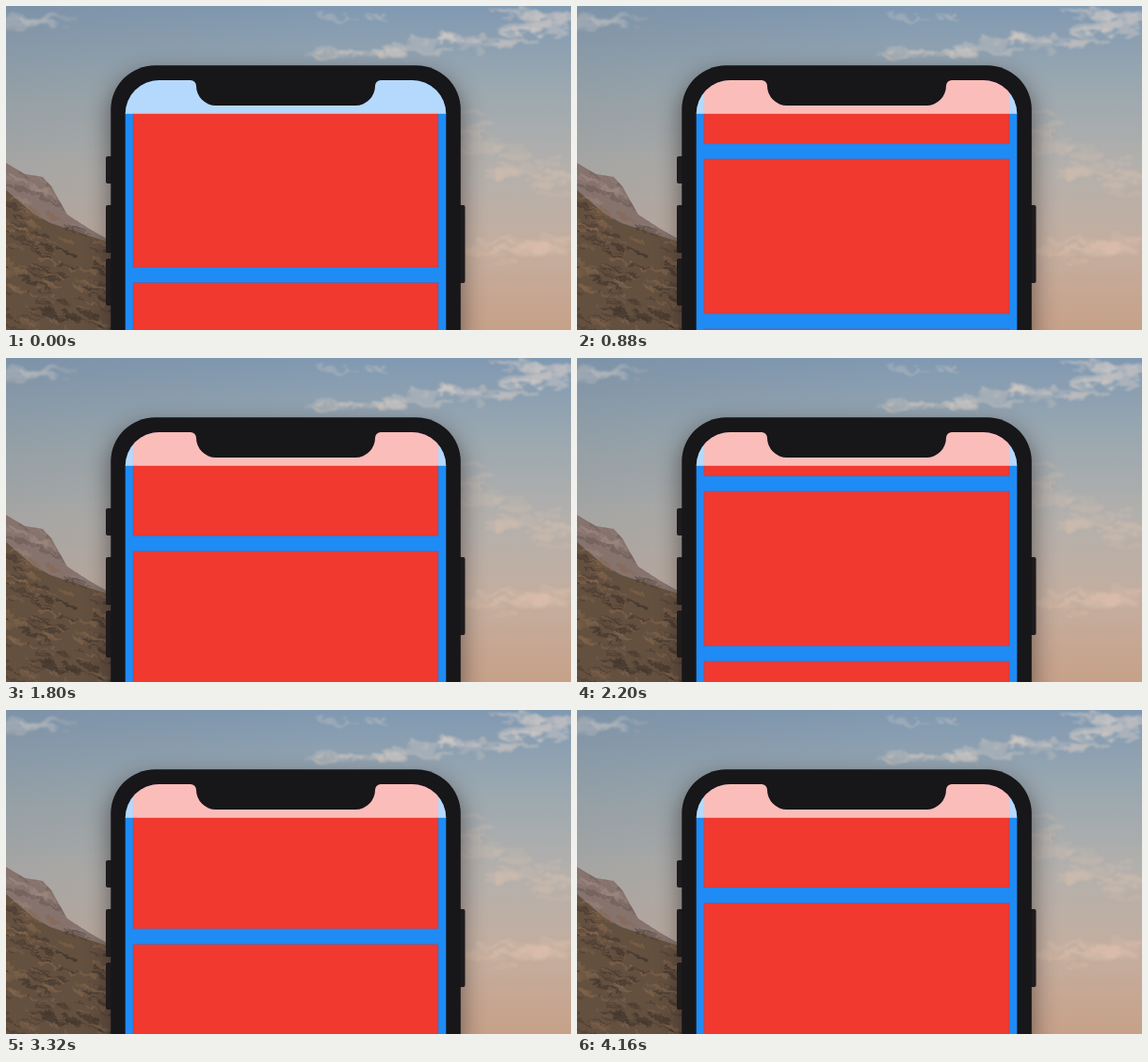
Write an HTML page that moves like this. It is 600 px wide and 345 px high and loops after 4.2 s.

```html
<!DOCTYPE html>
<html lang="en">
<head>
<meta charset="utf-8">
<title>Phone scroll</title>
<style>
  html, body { margin: 0; width: 100%; height: 100%; overflow: hidden; background: #8fa3b0; }
  svg { display: block; width: 600px; height: 345px; }
  #cards { animation: scroll 4200ms infinite; }

  /* Two long flicks; the curves keep the speed continuous between stops. */
  @keyframes scroll {
    0%      { transform: translateY(0); animation-timing-function: cubic-bezier(.333, 0, .667, .49); }
    10.476% { transform: translateY(-120.5px); animation-timing-function: cubic-bezier(.333, .324, .667, .684); }
    25.714% { transform: translateY(-397px); animation-timing-function: cubic-bezier(.333, .42, .667, .745); }
    42.857% { transform: translateY(-631.5px); animation-timing-function: cubic-bezier(.333, .52, .667, .94); }
    52.381% { transform: translateY(-695.5px); animation-timing-function: cubic-bezier(.333, .044, .667, .795); }
    79.048% { transform: translateY(-950px); animation-timing-function: cubic-bezier(.333, .89, .667, 1); }
    99.048%, 100% { transform: translateY(-994px); }
  }
</style>
</head>
<body>
<svg viewBox="0 0 600 345" color-interpolation-filters="sRGB">
  <defs>
    <linearGradient id="sky" x2="0" y2="1">
      <stop offset="0" stop-color="#8099b2"/>
      <stop offset=".25" stop-color="#9ba8b0"/>
      <stop offset=".5" stop-color="#b4b0ac"/>
      <stop offset=".75" stop-color="#c4ae9f"/>
      <stop offset="1" stop-color="#c7a189"/>
    </linearGradient>
    <linearGradient id="haze">
      <stop offset="0" stop-color="#6f7a80" stop-opacity=".2"/>
      <stop offset=".6" stop-color="#6f7a80" stop-opacity="0"/>
    </linearGradient>
    <filter id="wisp" filterUnits="userSpaceOnUse" x="-40" y="-40" width="680" height="420">
      <feTurbulence type="fractalNoise" baseFrequency=".05 .1" numOctaves="4" seed="8"/>
      <feDisplacementMap in="SourceGraphic" scale="22" xChannelSelector="R" yChannelSelector="G"/>
      <feGaussianBlur stdDeviation="1.1"/>
    </filter>
    <filter id="rough" filterUnits="userSpaceOnUse" x="-10" y="150" width="150" height="210">
      <feTurbulence type="fractalNoise" baseFrequency=".12" numOctaves="3" seed="4"/>
      <feDisplacementMap in="SourceGraphic" scale="9" xChannelSelector="R" yChannelSelector="G"/>
      <feGaussianBlur stdDeviation=".5"/>
    </filter>
    <filter id="soft" filterUnits="userSpaceOnUse" x="50" y="20" width="500" height="400">
      <feGaussianBlur stdDeviation="12"/>
    </filter>
    <clipPath id="ridge">
      <path d="M0 167L20 179 39 182 48 192 65 222 88 237 125 258V345H0Z"/>
    </clipPath>
    <clipPath id="screen">
      <rect x="126.7" y="79" width="340.6" height="320" rx="36"/>
    </clipPath>
  </defs>

  <rect width="600" height="345" fill="url(#sky)"/>
  <rect width="600" height="345" fill="url(#haze)"/>
  <g id="clouds" filter="url(#wisp)"></g>

  <g clip-path="url(#ridge)">
    <rect y="160" width="125" height="185" fill="#86736d"/>
    <path d="M0 196L29 221 47 231 125 257V345H0Z" fill="#64503f"/>
    <g id="rocks" filter="url(#rough)" stroke-linecap="round"></g>
  </g>

  <rect x="109" y="72" width="376" height="320" rx="46" fill="#20191a" opacity=".5" filter="url(#soft)"/>
  <g fill="#1e1b1d">
    <rect x="106" y="160" width="8" height="29" rx="2"/>
    <rect x="106" y="212" width="8" height="51" rx="2"/>
    <rect x="106" y="269" width="8" height="50" rx="2"/>
    <rect x="480" y="212" width="7.5" height="83" rx="2"/>
  </g>
  <rect x="111.3" y="63.3" width="371.5" height="340" rx="47" fill="#171619"/>

  <g clip-path="url(#screen)">
    <rect x="126" y="79" width="342" height="266" fill="#1f8bf5"/>
    <g id="cards"></g>
    <rect x="126" y="79" width="342" height="36" fill="#fff" opacity=".67"/>
    <rect x="126" y="114.5" width="342" height=".5" fill="#555" opacity=".35"/>
  </g>
  <path d="M196 78V79A6 6 0 0 1 202 85A21 21 0 0 0 223 106H371A21 21 0 0 0 392 85A6 6 0 0 1 398 79V78Z" fill="#171619"/>
</svg>
<script>
  let seed = 11;
  const random = () => (seed = seed * 16807 % 2147483647) / 2147483647;
  const between = (a, b) => a + (b - a) * random();

  const add = (parent, tag, attrs) => {
    const el = document.createElementNS("http://www.w3.org/2000/svg", tag);
    for (const key in attrs) el.setAttribute(key, attrs[key]);
    document.getElementById(parent).append(el);
  };

  const pitch = 181;
  for (let i = 0; i < 8; i++) {
    add("cards", "rect", {
      x: 135, y: 113.8 + i * pitch, width: 324, height: 164.2,
      fill: "#f1392f", stroke: "#85476e", "stroke-width": .4
    });
  }

  // Scatters wisps along a line from (x1, y1) to (x2, y2).
  const bank = (count, x1, y1, x2, y2, spread, size, fill, opacity) => {
    for (let i = 0; i < count; i++) {
      const t = random();
      add("clouds", "ellipse", {
        cx: x1 + (x2 - x1) * t,
        cy: y1 + (y2 - y1) * t + between(-spread, spread),
        rx: between(.5, 1.2) * size, ry: between(.1, .22) * size,
        fill, opacity: opacity * between(.5, 1)
      });
    }
  };
  bank(26, 340, 54, 590, 24, 9, 22, "#dfd2c8", .42);
  bank(8, 520, 4, 600, 14, 4, 22, "#d6cdc8", .45);
  bank(5, 0, 20, 60, 6, 6, 24, "#c9c6c4", .35);
  bank(4, 330, 12, 440, 6, 4, 11, "#d9d3cf", .5);
  bank(16, 490, 135, 600, 195, 22, 24, "#e0c4b2", .3);
  bank(14, 490, 265, 600, 258, 14, 24, "#e2c2ad", .32);

  // Ledges run down the slope to the right.
  for (let i = 0; i < 240; i++) {
    const x = between(-20, 115), y = between(170, 350), length = between(6, 24);
    const far = y < 200 + x * .5;
    const light = random() < .45;
    add("rocks", "path", {
      d: `M${x} ${y}l${length} ${length * between(.2, .6)}`,
      stroke: light ? (far ? "#a08a82" : "#87694f") : (far ? "#6a5b58" : "#3b3029"),
      "stroke-width": between(1, 4), opacity: between(.3, .65)
    });
  }
</script>
</body>
</html>
```
